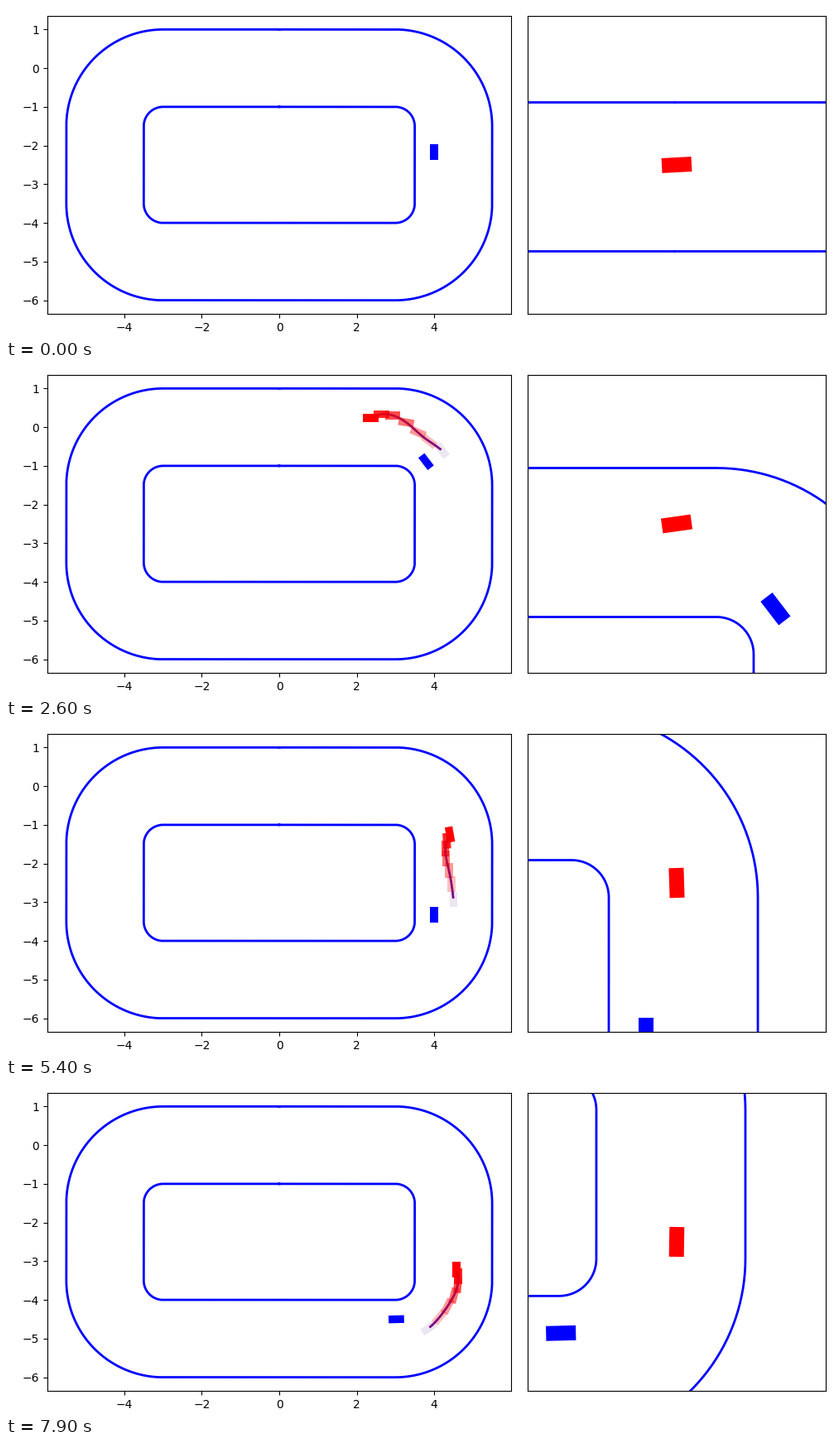
These frames come from a looping animation (1000 px wide and 400 px high, 8000 ms). A matplotlib script:

```python
import math

import numpy as np
import matplotlib.pyplot as plt
from matplotlib.animation import FuncAnimation
from matplotlib.collections import LineCollection
from matplotlib.patches import Rectangle
from matplotlib.transforms import Affine2D

DT = 0.1            # seconds per frame
FRAMES = 80
R = 1.5             # corner radius of the centre line
QUARTER = R * math.pi / 2
CAR = (0.4, 0.2)

STEPS = 7           # poses in the planned path
HORIZON = 1.2       # seconds planned ahead
TOP_SPEED = 2.1     # speed the plan works up to
LAG = 0.08          # the plan starts this long ago

# Red car: time, distance along lane, speed, lane offset, heading to lane
# in degrees, sideways swing of the plan
KEYS = np.array([
    (0.0, 0.028, 0.40, 0.161, 3, 0.00),
    (1.2, 0.906, 0.95, 0.063, -12, -0.14),
    (2.6, 2.467, 1.28, 0.250, 8, 0.03),
    (4.3, 4.174, 0.92, 0.051, -2, -0.15),
    (5.4, 5.151, 0.72, -0.076, -6, -0.15),
    (6.9, 6.308, 0.70, 0.039, 20, 0.18),
    (7.9, 7.130, 0.78, 0.078, -1, 0.02),
])
TIME, DIST, SPEED, OFFSET, HEADING, SWING = KEYS.T
DRIFT = SPEED * np.tan(np.radians(HEADING))


def hermite(t, y, v):
    """Value and rate of a cubic spline through the keys."""
    i = int(np.clip(np.searchsorted(TIME, t, side="right") - 1, 0, len(TIME) - 2))
    h = TIME[i + 1] - TIME[i]
    u = (t - TIME[i]) / h
    a, b, va, vb = y[i], y[i + 1], v[i] * h, v[i + 1] * h
    c2 = 3 * (b - a) - 2 * va - vb
    c3 = 2 * (a - b) + va + vb
    return a + va * u + c2 * u**2 + c3 * u**3, (va + 2 * c2 * u + 3 * c3 * u**2) / h


def place(s, d):
    """Lane coordinates to x, y and the lane's direction."""
    r = R + d
    if s < 3:
        return s, d, 0.0
    s -= 3
    if s < QUARTER:
        a = s / R
        return 3 + r * math.sin(a), -1.5 + r * math.cos(a), -a
    s -= QUARTER
    if s < 2:
        return 3 + r, -1.5 - s, -math.pi / 2
    s -= 2
    if s < QUARTER:
        a = s / R
        return 3 + r * math.cos(a), -3.5 - r * math.sin(a), -math.pi / 2 - a
    return 3 - (s - QUARTER), -3.5 - r, -math.pi


def outline(r):
    """Closed rounded rectangle with corner radius r, starting at the top."""
    x, y = [0], [-1.5 + r]
    corners = [(3, -1.5, 90), (3, -3.5, 0), (-3, -3.5, -90), (-3, -1.5, -180)]
    for cx, cy, start in corners:
        a = np.radians(np.linspace(start, start - 90, 40))
        x.extend(cx + r * np.cos(a))
        y.extend(cy + r * np.sin(a))
    return x + [0], y + [-1.5 + r]


def make_car(ax, color, alpha=1.0):
    w, h = CAR
    return ax.add_patch(Rectangle((-w / 2, -h / 2), w, h, fc=color, ec="none",
                                  alpha=alpha, zorder=3))


def pose(car, x, y, angle):
    move = Affine2D().rotate(angle).translate(x, y)
    car.set_transform(move + car.axes.transData)


fig = plt.figure(figsize=(10, 4), dpi=100, facecolor="white")
overview = fig.add_axes([0.05, 0.07, 0.56, 0.9])
closeup = fig.add_axes([0.63, 0.07, 0.36, 0.9])
overview.set_aspect("equal", adjustable="datalim")
closeup.set_xticks([])
closeup.set_yticks([])

for ax in (overview, closeup):
    for radius in (2.5, 0.5):
        ax.plot(*outline(radius), color="blue", lw=2, zorder=2)

ghosts = [make_car(overview, "red" if k < STEPS - 1 else "indigo", 1 - 0.15 * k)
          for k in range(STEPS)]
trail = LineCollection([], linewidths=2, zorder=4)
overview.add_collection(trail, autolim=False)
rivals = [make_car(ax, "blue") for ax in (overview, closeup)]
hero = make_car(closeup, "red")


def draw_plan(t):
    s0, _ = hermite(t - LAG, DIST, SPEED)
    d0, _ = hermite(t - LAG, OFFSET, DRIFT)
    _, speed = hermite(t, DIST, SPEED)
    swing = np.interp(t, TIME, SWING)

    def point(w):
        """Pose at share w of the plan: speed up, swing out, settle mid-lane."""
        s = s0 + HORIZON * (speed * w + (TOP_SPEED - speed) * w**2 / 2)
        settle = 1 - w + 0.6 * math.sin(2 * math.pi * w)
        return place(s, d0 * settle + swing * math.sin(math.pi * w))

    for ghost, w in zip(ghosts, np.linspace(0, 1, STEPS)):
        pose(ghost, *point(w))
    shares = np.linspace(0, 0.99, 40)
    pts = np.array([point(w)[:2] for w in shares])
    trail.set_segments(np.stack([pts[:-1], pts[1:]], axis=1))
    trail.set_color([(1 - 0.58 * w, 0, 0.5 * w) for w in shares[1:]])


def update(frame):
    t = frame * DT
    s, speed = hermite(t, DIST, SPEED)
    d, drift = hermite(t, OFFSET, DRIFT)
    x, y, lane = place(s, d)
    pose(hero, x, y, lane + math.atan2(drift, speed))
    closeup.set_xlim(x - 2, x + 2)
    closeup.set_ylim(y - 2, y + 2)

    # the rival waits on the far side until the run begins
    rival_s = 1.775 + t if frame else 6.026
    for car in rivals:
        pose(car, *place(rival_s, -0.5))

    running = frame > 0
    for part in ghosts + [trail]:
        part.set_visible(running)
    if running:
        draw_plan(t)
    return []


anim = FuncAnimation(fig, update, frames=FRAMES, init_func=lambda: update(0),
                     interval=100, repeat=True, repeat_delay=0, blit=False)
plt.show()
```
